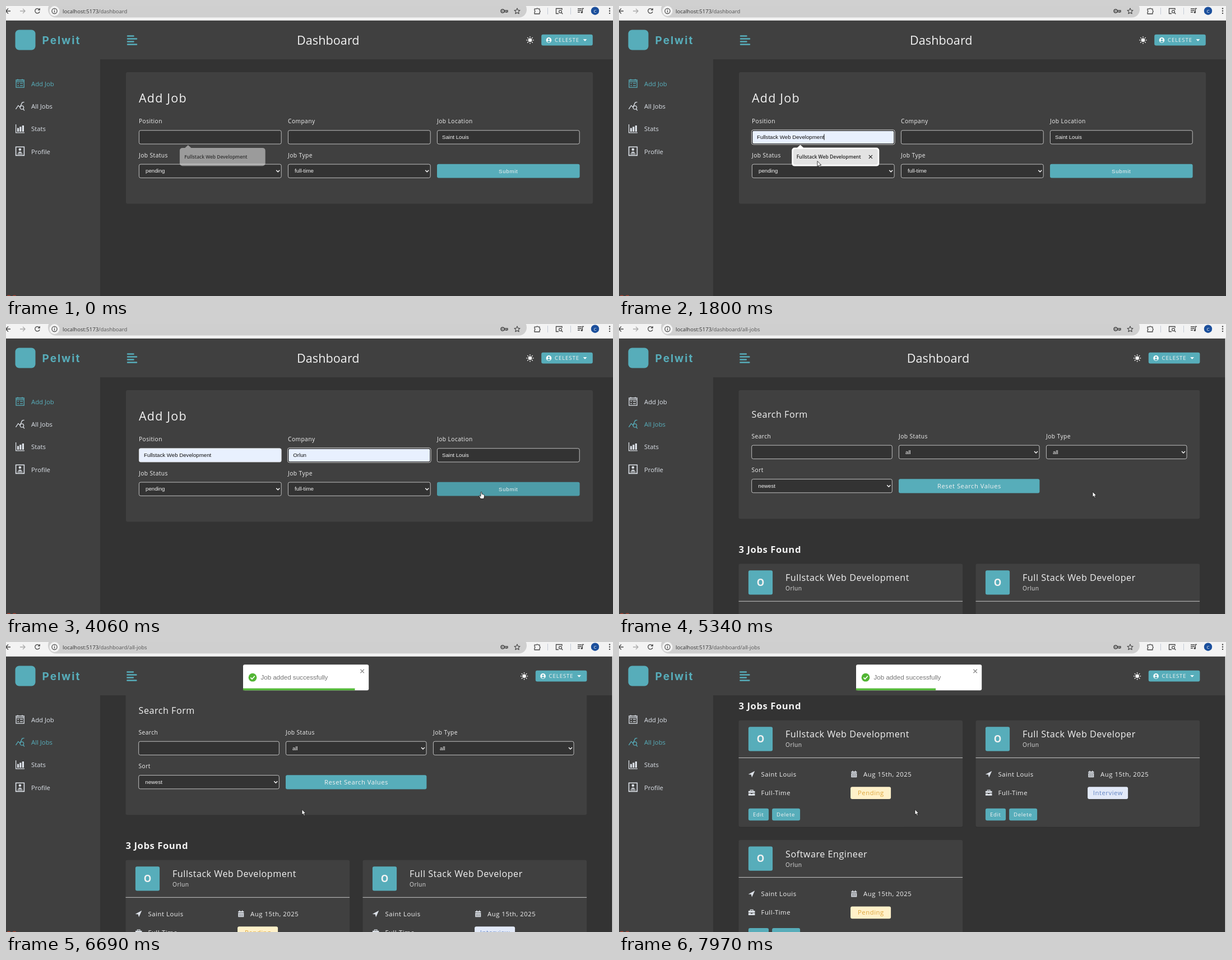
An HTML page that plays this animation: 1083x517 px, repeating every 8 s.

```html
<!DOCTYPE html>
<html lang="en">
<head>
<meta charset="utf-8">
<title>Job dashboard</title>
<style>
  html, body { margin: 0; width: 100%; height: 100%; overflow: hidden; background: #333; }
  svg { display: block; width: 100%; height: 100%; }
  text { font-family: "Open Sans", "Noto Sans", sans-serif; fill: #f2f2f2; white-space: pre; }
  .url { font-size: 9.5px; fill: #333; }
  .brand { font: 700 19px Inter, sans-serif; letter-spacing: 2px; fill: #57adba; }
  .h1 { font-size: 21.5px; letter-spacing: .1px; }
  .h2 { font-size: 21.5px; letter-spacing: 1.2px; }
  .h3 { font-size: 16.2px; letter-spacing: .5px; }
  .found { font-size: 16.7px; font-weight: 700; letter-spacing: .55px; }
  .label { font-size: 10.2px; letter-spacing: .45px; }
  .link { font-size: 11.3px; fill: inherit; }
  .info { font-size: 11.3px; letter-spacing: .55px; }
  .small { font-size: 9.6px; letter-spacing: .65px; }
  .reset { font-size: 11.2px; letter-spacing: .54px; }
  .field { font: 9.68px "Liberation Sans", Arial, sans-serif; }
  .send { letter-spacing: .726px; }
  .dark { fill: #111; }
  .hint { font-size: 8.6px; font-weight: 600; fill: #222; }
  .toast { font: 11.6px "Liberation Sans", Arial, sans-serif; fill: #757575; }
  .tile { font-size: 17px; font-weight: 700; }
  .mid { text-anchor: middle; }
</style>
</head>
<body>
<svg id="stage" viewBox="0 0 1083 517" preserveAspectRatio="none"></svg>
<script>
const LOOP = 8000, TEAL = '#57adba', PANEL = '#404040', BODY = '#333', PALE = '#dce1e8';
const FILLED = '#e8f0fe', COMPANY = 'Orlun', ROLE = 'Fullstack Web Development';

// Markup helpers
const rect = (x, y, w, h, fill, r = 0, more = '') =>
  `<rect x="${x}" y="${y}" width="${w}" height="${h}" rx="${r}" fill="${fill}" ${more}/>`;
const text = (x, y, s, cls, more = '') => `<text x="${x}" y="${y}" class="${cls}" ${more}>${s}</text>`;
const path = (d, more = '') => `<path d="${d}" ${more}/>`;
const line = (d, color, w = 1.3, more = '') =>
  path(d, `fill="none" stroke="${color}" stroke-width="${w}" ${more}`);
const dot = (x, y, r, fill, more = '') => `<circle cx="${x}" cy="${y}" r="${r}" fill="${fill}" ${more}/>`;
const group = (id, body, more = '') => `<g id="${id}" ${more}>${body}</g>`;
const at = (x, y, body) => `<g transform="translate(${x} ${y})">${body}</g>`;

// Bordered control; x, y and w are its outer edges
const box = (x, y, w, id = '') =>
  rect(x + .4, y + .4, w - .8, 24.2, BODY, 2.8, `stroke="#e2e2e2" stroke-width=".8" ${id && `id="${id}"`}`);
const select = (x, y, w, value) => box(x, y, w) + text(x + 12, y + 15.7, value, 'field') +
  line(`M${x + w - 9.4} ${y + 11.1}l3 3l3 -3`, '#fff', 1.4);
const ring = (id, x) => group(id,
  rect(x + .5, 221.9, 253.6, 24, 'none', 2.6, 'stroke="#101010" stroke-width="1.5"') +
  rect(x - .5, 220.9, 255.6, 26, 'none', 3.4, 'stroke="#fff" stroke-width=".8"'));

function browserBar() {
  const ink = '#474747', rays = 'stroke-linecap="round" stroke-linejoin="round"';
  return rect(0, 0, 1083, 26, '#f3f3f3') + rect(0, 24.6, 1083, 1.4, '#dedede') +
    rect(75, -8, 854, 28.5, '#cfcfcf', 14) +
    line('M8 9H0M4 4.5L-.5 9L4 13.5', ink) +
    line('M25 9H34M30 5L34 9L30 13', '#aaa') +
    line('M59.6 6.6A4.2 4.2 0 1 0 60 10M60.2 4V7.2H57', ink) +
    dot(86.5, 9, 9, '#f3f3f3') + dot(86.5, 9, 4.6, 'none', `stroke="${ink}" stroke-width="1.2"`) +
    line('M86.5 8.4V11.6M86.5 6.2V7.4', ink) +
    `<text x="101" y="12.6" class="url">localhost:5173<tspan id="route" fill="#555"></tspan></text>` +
    dot(886, 9, 3, 'none', `stroke="${ink}" stroke-width="1.4"`) + dot(885.5, 9, 1, ink) +
    line('M889 8H895V10.5H889M893 10V12', ink) +
    line('M912 4l1.5 3.4l3.6 .3l-2.7 2.4l.8 3.6l-3.2 -1.9l-3.2 1.9l.8 -3.6l-2.7 -2.4l3.6 -.3z', ink, 1.1, rays) +
    line('M943 5.2H946.2A1.7 1.7 0 0 1 949.4 5.2H952V8A1.7 1.7 0 0 1 952 11.2V14H943V11A1.7 1.7 0 0 0 943 8z', ink, 1.3, rays) +
    rect(966, 3, 1, 12, '#c4cbd6') + rect(1007, 3, 1, 12, '#c4cbd6') +
    line('M986 13.5H981.5V4.5H992V7', ink) + dot(989, 10, 2.4, 'none', `stroke="${ink}" stroke-width="1.2"`) +
    line('M991 12l2.3 2.3', ink) +
    line('M1020 5H1027M1020 8H1027M1020 11H1024M1028.4 11V4.5H1031', ink) + dot(1027.3, 11.2, 1.7, ink) +
    dot(1051, 8.7, 7.2, '#1b4f9c') + text(1051, 11.6, 'C', 'mid', 'style="font-size:8px"') +
    [4.5, 8.7, 12.9].map(y => dot(1077, y, 1.2, ink)).join('');
}

function sidebar() {
  const s = 'fill="none" stroke="currentColor" stroke-width="1.3"';
  const item = (id, y, label, icon) =>
    group(id, at(25, y, icon) + text(45, y + 4.8, label, 'link'));
  return rect(0, 26, 168, 491, PANEL) +
    rect(16.5, 42.5, 36, 36, TEAL, 7) + text(64.5, 67.5, 'Pelwit', 'brand') +
    item('navAdd', 138.2, 'Add Job',
      path('M-7 -6.2H7.2V7H-7zM-7 -3.4H7M-4.6 -.4H-2M0 -.4H5M-4.6 3.6H-2M0 3.6H5M-4 -8V-5M4 -8V-5', s)) +
    item('navAll', 178.4, 'All Jobs',
      path('M-7.5 5.5L-3.2 -1L0 2L4 -6.5L7.5 -7M5.8 5.6L8 8', s) +
      path('M6.6 2.6A3.2 3.2 0 1 1 .2 2.6A3.2 3.2 0 1 1 6.6 2.6', s)) +
    item('navStats', 218.6, 'Stats',
      path('M-7.4 -7.5V7.2H8', s) + path('M-5 -1H-2V5.4H-5zM-.8 -3.4H2.4V5.4H-.8zM3.8 -5.6H7V5.4H3.8z', 'fill="currentColor"')) +
    item('navProfile', 258.8, 'Profile',
      path('M-7.4 -7.6H7.4V7.6H-7.4z', s.replace('1.3', '1.6')) +
      path('M-2.4 -3A2.3 2.3 0 1 1 2.2 -3A2.3 2.3 0 1 1 -2.4 -3M-4 3.2Q0 -2 4 3.2zM-4.4 4.2H4.4V5.4H-4.4z', 'fill="currentColor"')) +
    line('M2 518.4a3 2.4 0 0 1 6 0M12 518.4a3 2.4 0 0 1 6 0', '#c9452f', 1.2);
}

function navbar() {
  let rays = '';
  for (let i = 0; i < 8; i++) {
    const a = i * Math.PI / 4, c = Math.cos(a), s = Math.sin(a);
    rays += `M${935 + 4.6 * c} ${60.8 + 4.6 * s}L${935 + 6.6 * c} ${60.8 + 6.6 * s}`;
  }
  return rect(168, 26, 915, 69, PANEL) +
    group('menu', line('M217 53.4H227.5M217 58.4H233M217 63.4H227.5M217 68.4H233', TEAL, 2.5, 'stroke-linecap="round"')) +
    group('title', text(519, 69, 'Dashboard', 'h1')) +
    group('user', dot(935, 60.8, 3.3, '#fff') + line(rays, '#fff', 1.3) +
      rect(955.2, 50.8, 91.6, 19.8, TEAL, 3) +
      dot(968.5, 60.9, 4.8, '#fff') + dot(968.5, 59.4, 1.6, TEAL) +
      path('M965.5 63.8Q968.5 59.8 971.5 63.8Q968.5 66 965.5 63.8', `fill="${TEAL}"`) +
      text(979, 64.2, 'CELESTE', 'small', 'style="letter-spacing:.9px"') +
      path('M1029.6 59.3H1036.4L1033 62.8z', 'fill="#fff"'));
}

// Suggestion bubble: rows of text under a small pointer
function bubble(id, x, w, tip, rows) {
  const h = rows.length * 26 + 7;
  const cross = line(`M${x + w - 18.4} 265.8l6 6m0 -6l-6 6`, '#222', 1.2);
  return group(id,
    rect(x, 252.6, w, h, '#fff', 5) + path(`M${tip - 6} 253L${tip} 247.6L${tip + 6} 253z`, 'fill="#fff"') +
    group(id + 'Hover', rect(x + 2.5, 255, w - 5, 28, '#e3e3e3', 4) + cross) +
    rows.map((r, i) => text(x + 8.5, 271.8 + i * 26, r, 'hint')).join(''));
}

function addPage() {
  return rect(214, 118, 833, 234.5, PANEL, 3) + text(237, 171.8, 'Add Job', 'h2') +
    text(237, 209, 'Position', 'label') + text(503, 209, 'Company', 'label') +
    text(769, 209, 'Job Location', 'label') +
    text(237, 269.6, 'Job Status', 'label') + text(503, 269.6, 'Job Type', 'label') +
    box(237, 221.4, 254.6, 'posBox') + box(503, 221.4, 254.6, 'coBox') + box(769, 221.4, 254.6) +
    ring('posRing', 237) + ring('coRing', 503) +
    text(246, 237.2, ROLE, 'field dark', 'id="posText"') +
    text(512.3, 237.2, COMPANY, 'field dark', 'id="coText"') +
    text(778, 237.2, 'Saint Louis', 'field') +
    rect(0, 228.3, .9, 10.8, '#fff', 0, 'id="caret"') +
    select(237, 281.7, 254.6, 'pending') + select(503, 281.7, 254.6, 'full-time') +
    rect(769, 281.7, 254.6, 24.8, TEAL, 3, 'id="submit"') +
    text(879, 297.5, 'Submit', 'field send') +
    bubble('posTip', 308.3, 156, 323.5, [ROLE]) +
    bubble('coTip', 573.8, 113, 589, [COMPANY, 'Felthorne', 'Fellthorne']);
}

function card(x, y, role, status, bg, ink) {
  const plane = path('M-6 .6L5.6 -5.6L.4 6L-1 1z', `fill="${PALE}"`);
  const calendar = path('M-5 -4.4H5V-2.2H-5zM-5 -1.4H5V5.8H-5zM-3 -6H-1.6V-4H-3zM1.6 -6H3V-4H1.6z', `fill="${PALE}"`) +
    line('M-3.4 .8H3.6M-3.4 3.4H3.6', PANEL, 1.2, 'stroke-dasharray="1.6 1"');
  const caseIcon = path('M-5.8 -3H5.8V.4H-5.8zM-5.8 1.2H-1.4V2.4H1.4V1.2H5.8V5H-5.8z', `fill="${PALE}"`) +
    line('M-2.4 -3V-4.6H2.4V-3', PALE, 1.2);
  const button = (bx, w, label) => rect(bx, 157, w, 21.6, TEAL, 3) + text(bx + 8, 171.4, label, 'small');
  return at(x, y,
    rect(0, 1.2, 399.6, 190, '#2c2c2c', 3, 'opacity=".6"') + rect(0, 0, 399.6, 190, PANEL, 3) +
    rect(17.4, 11.6, 43.2, 43.2, TEAL, 3) + text(39, 39.4, COMPANY[0], 'tile mid') +
    text(83.5, 30.8, role, 'h3') + text(83.5, 47.8, COMPANY, 'label', 'style="fill:#ddd"') +
    rect(0, 66.2, 399.6, .9, '#d5d5d5') +
    at(23.2, 95.8, plane) + text(40, 100, 'Saint Louis', 'info') +
    at(205.8, 95.8, calendar) + text(222.6, 100, 'Aug 15th, 2025', 'info') +
    at(23.2, 129, caseIcon) + text(40, 133.3, 'Full-Time', 'info') +
    rect(199.6, 118.6, 72, 21.6, bg, 3) +
    text(235.9, 133.3, status, 'info mid', `style="fill:${ink}"`) +
    button(17.4, 36.2, 'Edit') + button(59.6, 50, 'Delete'));
}

function jobsPage() {
  const pending = ['Pending', '#fff1c9', '#dda63c'];
  return rect(213.5, 118, 822.7, 229.3, PANEL, 3) + text(236.5, 167.3, 'Search Form', 'h3') +
    text(236.5, 203.8, 'Search', 'label') + text(499, 203.8, 'Job Status', 'label') +
    text(762, 203.8, 'Job Type', 'label') + text(236.5, 264.2, 'Sort', 'label') +
    box(236.3, 215.8, 251.4) + select(499, 215.8, 251.4, 'all') + select(762, 215.8, 251.4, 'all') +
    select(236.3, 276.2, 251.4, 'newest') +
    rect(499, 276.2, 251.4, 25.2, TEAL, 3) + text(568, 293.3, 'Reset Search Values', 'reset') +
    text(213.5, 408.2, '3 Jobs Found', 'found') +
    card(213.5, 427.6, ROLE, ...pending) +
    card(636.5, 427.6, 'Full Stack Web Developer', 'Interview', '#e2e9f8', '#6284c4') +
    card(213.5, 640.9, 'Software Engineer', ...pending);
}

const toast = () => rect(422.6, 40.4, 225, 46.6, '#000', 4, 'opacity=".1"') +
  rect(423, 40.2, 224.2, 46, '#fff', 3) +
  dot(440, 63.2, 7.4, '#52b534') + line('M436.4 63.4l2.6 2.7l4.8 -5.4', '#fff', 1.7) +
  text(454.5, 67.2, 'Job added successfully', 'toast') +
  line('M632.4 48.8l6.4 6.4m0 -6.4l-6.4 6.4', '#8a8a8a', 1.3) +
  rect(423, 82.6, 224.2, 3.6, '#55b83a', 0, 'id="progress"');

const cursors = () => {
  const skin = 'fill="#fff" stroke="#111" stroke-width=".8" stroke-linejoin="round"';
  return group('arrow', path('M0 0V9.6L2.2 7.6L3.8 11L5.4 10.2L3.9 7H6.8z', skin)) +
    group('beam', line('M-2.2 -5.2Q0 -5.2 0 -4Q0 -5.2 2.2 -5.2M0 -4.6V4.6M-2.2 5.2Q0 5.2 0 4Q0 5.2 2.2 5.2', '#e8e8e8', 1)) +
    group('hand', path('M-1 -5Q0 -6.4 1 -5V-1.6Q2 -2.4 2.6 -1.2Q3.6 -2 4.2 -.6Q5.4 -1 5.4 .6V3L4.4 6.6H-1.2L-3.8 2Q-4.2 .6 -2.8 .8L-1 2.4z', skin));
};

document.getElementById('stage').innerHTML =
  '<clipPath id="view"><path d="M0 26H1083V517H0z"/></clipPath>' +
  rect(0, 0, 1083, 517, BODY) + group('addPage', addPage()) + group('jobsPage', jobsPage()) +
  navbar() + sidebar() + rect(1081.6, 26, 1.4, 491, '#f4f4f4', 0, 'id="edge"') +
  `<g clip-path="url(#view)">${group('toast', toast())}${group('cursor', cursors())}</g>` + browserBar();

const el = {};
document.querySelectorAll('[id]').forEach(n => el[n.id] = n);
const set = (id, name, v) => el[id].setAttribute(name, v);
const show = (id, on) => set(id, 'display', on ? 'inline' : 'none');
const move = (id, x, y = 0) => set(id, 'transform', `translate(${x} ${y})`);
const clamp = v => Math.max(0, Math.min(1, v));
const smooth = p => p * p * (3 - 2 * p);
const easeOut = p => 1 - (1 - p) ** 3;

// Value of keyed tracks [time, ...values] at t
function track(keys, t, ease = p => p) {
  let i = 0;
  while (i < keys.length - 2 && t >= keys[i + 1][0]) i++;
  const [a, b] = [keys[i], keys[i + 1]];
  const p = ease(clamp((t - a[0]) / (b[0] - a[0])));
  return a.slice(1).map((v, k) => v + (b[k + 1] - v) * p);
}

const POINTER = [[0, 980, 530], [70, 977, 512], [800, 828, 239], [930, 826, 237], [1060, 590, 212],
  [1200, 360, 232], [1340, 360, 233], [1540, 354, 276.5], [2200, 354, 276.5], [2480, 545, 226],
  [3000, 545, 226], [3400, 598, 266], [3800, 600, 267], [4040, 848, 305], [5200, 848, 305],
  [5210, 845, 299], [6060, 845, 299], [6480, 528, 298.5], [8000, 528, 298.5]];
const SCROLL = [[6500, 0], [7290, 161.2], [7970, 287.9]];
const DROP = [[5330, -2178], [5750, 18], [5855, -7.3], [5960, 3.6], [6030, 0]];

const fade = (t, from, to) => clamp((t - from) / 100) * clamp(1 - (t - to) / 110);

function tip(id, opacity, hover, cx, cy) {
  const s = .96 + .04 * opacity;
  set(id, 'opacity', opacity);
  set(id, 'transform', `translate(${cx} ${cy}) scale(${s}) translate(${-cx} ${-cy})`);
  show(id + 'Hover', hover);
}

function drawForm(t) {
  const posFilled = t >= 1450, coFilled = t >= 3330;
  const inPos = t >= 1100 && t < 2450, inCo = t >= 2450 && t < 5200;
  set('posBox', 'fill', posFilled ? FILLED : BODY);
  set('coBox', 'fill', coFilled ? FILLED : BODY);
  show('posText', posFilled);
  show('coText', coFilled);
  show('posRing', inPos);
  show('coRing', inCo);
  const caretX = inPos ? (posFilled ? 365.6 : 246) : (coFilled ? 534.6 : 512);
  set('caret', 'x', caretX);
  set('caret', 'fill', (inPos ? posFilled : coFilled) ? '#111' : '#fff');
  show('caret', inPos || inCo && (t < 3940 || t >= 4470 && t < 5010));
  tip('posTip', Math.max(.48 * clamp(1 - t / 130), fade(t, 1100, 2200)), t >= 1450, 386.3, 267);
  tip('coTip', fade(t, 2450, 3690), t >= 3330, 630, 295);
}

function cursorKind(t, x, y) {
  if (t >= 5200) return 'arrow';
  if (x > 769 && x < 1023 && y > 282 && y < 308) return 'hand';
  const column = (x - 237) % 266;
  return y > 221 && y < 247 && column > 0 && column < 254.4 ? 'beam' : 'arrow';
}

function draw(t) {
  const jobs = t >= 5340;
  show('addPage', !jobs);
  show('jobsPage', jobs);
  show('edge', jobs);
  show('toast', jobs);
  el.route.textContent = jobs ? '/dashboard/all-jobs' : '/dashboard';
  move('menu', jobs ? -.6 : 0);
  move('title', jobs ? -5.3 : 0);
  move('user', jobs ? -10.4 : 0);
  const tint = { navAdd: jobs ? PALE : TEAL, navAll: jobs ? TEAL : PALE, navStats: PALE, navProfile: PALE };
  for (const id in tint) {
    set(id, 'fill', tint[id]);
    set(id, 'color', tint[id]);
  }
  const [x, y] = track(POINTER, t, smooth);
  const kind = cursorKind(t, x, y);
  for (const k of ['arrow', 'beam', 'hand']) show(k, k === kind);
  move('cursor', x, y);
  if (jobs) {
    move('jobsPage', 0, -track(SCROLL, t)[0]);
    move('toast', 0, track(DROP, t, easeOut)[0]);
    set('progress', 'width', 224.2 * (1 - clamp((t - 6140) / 5000)));
  } else {
    drawForm(t);
    set('submit', 'fill', kind === 'hand' || t >= 5200 ? '#4d9ca8' : TEAL);
  }
}

const start = performance.now();
function tick() {
  draw((performance.now() - start) % LOOP);
  requestAnimationFrame(tick);
}
tick();
</script>
</body>
</html>
```
